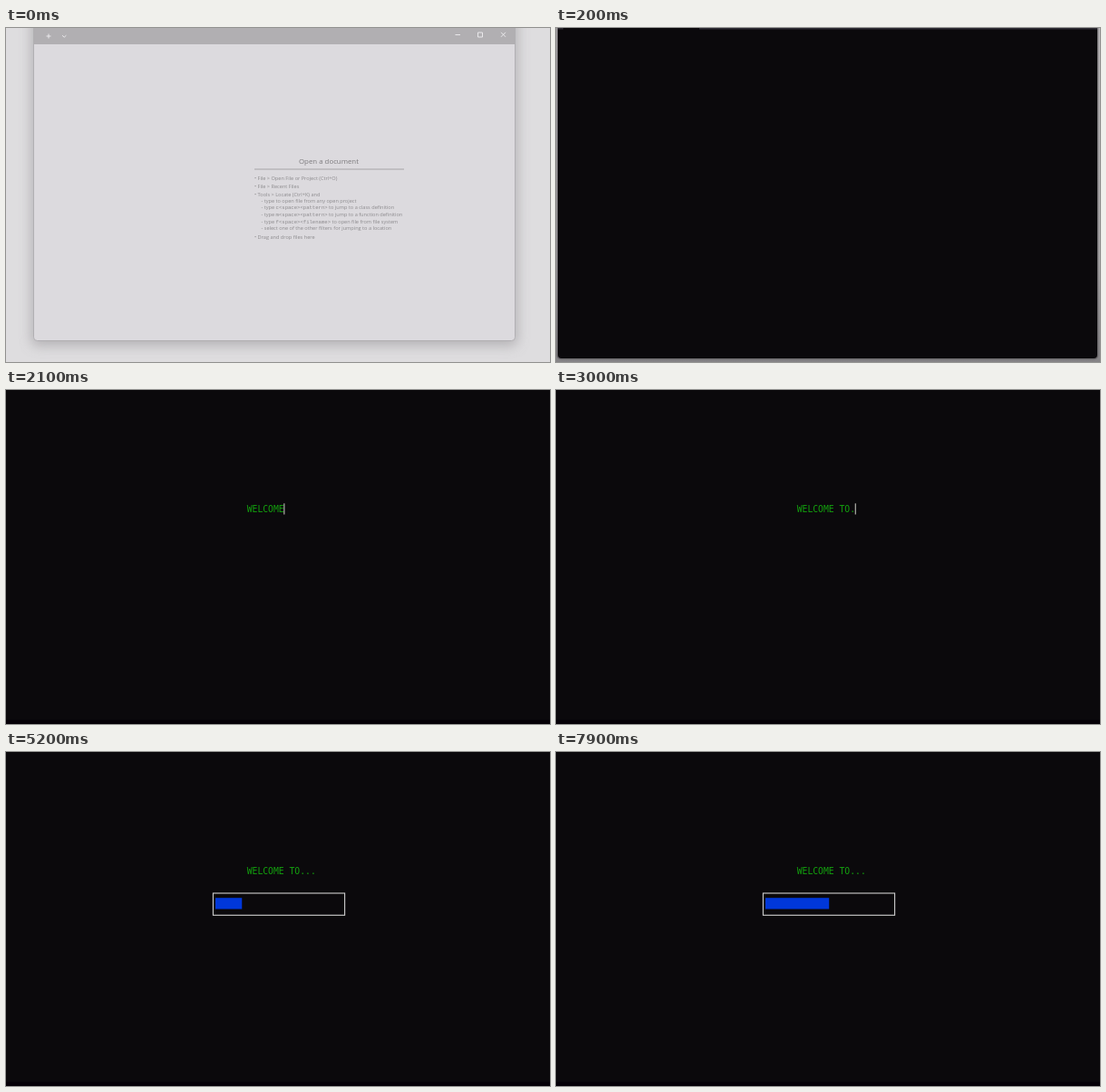
Write an HTML page that moves like this. It is 600 px wide and 369 px high and loops after 8000 ms.

```html
<!DOCTYPE html>
<html lang="en">
<head>
<meta charset="utf-8">
<title>Terminal welcome</title>
<style>
  html, body { margin: 0; width: 100%; height: 100%; overflow: hidden; background: #0b090c; }
  svg { display: block; width: 600px; height: 369px; }
  .hint { font: 5.6px "Open Sans", "Noto Sans", sans-serif; fill: #8c8a8d; }
  .hint .head { font-size: 7.85px; fill: #7c7a7d; }
  .hint .code { font: 5.6px "Liberation Mono", monospace; }
  .icon { fill: none; stroke: #f0eff1; stroke-width: .9; }
  .typed { font: 9.72px "DejaVu Sans Mono", "Noto Sans Mono", monospace; fill: #13a10e; white-space: pre; }
</style>
</head>
<body>
<svg viewBox="0 0 600 369">
  <defs>
    <filter id="soft" x="-10%" y="-10%" width="120%" height="120%"><feGaussianBlur stdDeviation="7"/></filter>
    <linearGradient id="edge" x1="0" y1="0" x2="0" y2="1">
      <stop offset="0" stop-color="#bcbabc"/><stop offset=".7" stop-color="#aaa8aa"/><stop offset="1" stop-color="#858386"/>
    </linearGradient>
  </defs>

  <g id="editor">
    <rect width="600" height="369" fill="#dedddf"/>
    <rect x="28" y="-20" width="536" height="371" rx="6" fill="#a5a3a6" opacity=".75" filter="url(#soft)"/>
    <rect x="30.5" y="-10" width="531" height="355.5" rx="4" fill="#dcdade" stroke="#aaa8ab" stroke-width=".8"/>
    <rect x="30" width="531.5" height="18" fill="#b1afb2"/>
    <path class="icon" d="M44.5 9h5M47 6.5v5M62 8.2l2.2 2 2.2-2M495.5 7.5h5.5M520.5 5h5v5h-5zM546 4.8l5 5M551 4.8l-5 5"/>
    <path d="M274 156h165" stroke="#a5a3a6"/>
    <g id="hint" class="hint">
      <text class="head" x="356" y="149.6" text-anchor="middle">Open a document</text>
    </g>
  </g>

  <g id="opening">
    <rect width="600" height="369" fill="url(#edge)"/>
    <rect id="shade" fill="#5f5d60" rx="5" opacity=".6"/>
    <rect id="pane" fill="#0b090c" rx="4"/>
    <rect id="tabs" x="158" fill="#2e2c34"/>
    <rect id="nub" width="6" fill="#2e2c34"/>
  </g>

  <g id="term">
    <rect width="600" height="369" fill="#0b090c"/>
    <rect y="364.5" width="600" height="4.5" fill="#050007"/>
    <text id="typed" class="typed" x="265.7" y="135"></text>
    <g id="meter">
      <rect x="228.4" y="156" width="145.2" height="24.3" fill="none" stroke="#d0d0d0" stroke-width="1.1"/>
      <rect id="fill" x="231" y="161.2" height="12.3" fill="#0037da"/>
    </g>
    <rect id="caret" width="1" height="12.2" fill="#d0d0c8"/>
  </g>
</svg>
<script>
const $ = id => document.getElementById(id);
const LOOP = 8000, CELL = 5.85;
const MESSAGE = "WELCOME TO...";
const keyTimes = [900, 1100, 1300, 1500, 1700, 1900, 2100, 2300, 2500, 2800, 3000, 3200, 3400];
const blockTimes = [3400, 3800, 4100, 4500, 5000, 5400, 5700, 6200, 6600, 7000, 7400, 7800];
// the caret switches on, off, on, ... at these times
const caretTimes = [1100, 1400, 1500, 1600, 1700, 2000, 2100, 2200, 2300, 2900, 3000, 3100, 3200, 3400,
  3600, 4200, 4500, 4700, 5000, 5200, 5400, 6300, 6600, 6800, 6900, 7900];

const hints = [
  [274, 167.6, "• File > Open File or Project (Ctrl+O)"],
  [274, 176.6, "• File > Recent Files"],
  [274, 185.7, "• Tools > Locate (Ctrl+K) and"],
  [281.5, 192.7, "- type to open file from any open project"],
  [281.5, 200.2, "- type ", "c<space><pattern>", " to jump to a class definition"],
  [281.5, 208, "- type ", "m<space><pattern>", " to jump to a function definition"],
  [281.5, 215.6, "- type ", "f<space><filename>", " to open file from file system"],
  [281.5, 223.3, "- select one of the other filters for jumping to a location"],
  [274, 232.5, "• Drag and drop files here"]
];

function set(el, attrs) {
  for (const name in attrs) el.setAttribute(name, attrs[name]);
}
function show(id, on) {
  $(id).style.display = on ? "" : "none";
}
function make(name, parent) {
  return parent.appendChild(document.createElementNS("http://www.w3.org/2000/svg", name));
}
const passed = (times, t) => times.filter(v => v <= t).length;

for (const [x, y, ...parts] of hints) {
  const line = make("text", $("hint"));
  set(line, { x, y });
  line.style.whiteSpace = "pre";
  parts.forEach((part, i) => {
    const span = make("tspan", line);
    span.textContent = part;
    if (i === 1) span.setAttribute("class", "code");
  });
}

function drawOpening(t) {
  const step = Math.floor(t / 100);
  const inset = [6, 2, 0][step - 1] || 0;
  const bar = [3.8, 1.5, 0][step - 1] || 0;
  const right = 599 - inset;
  set($("shade"), { x: inset - 1.5, y: -10, width: right - inset + 3, height: 376.5 });
  set($("pane"), { x: inset, y: -10, width: right - inset, height: 375 });
  set($("tabs"), { width: right - 158, height: bar });
  set($("nub"), { x: inset, height: bar });
}

function draw(t) {
  show("editor", t < 100);
  show("opening", t >= 100 && t < 400);
  show("term", t >= 400);
  if (t < 400) return drawOpening(t);

  const keys = passed(keyTimes, t), blocks = passed(blockTimes, t);
  $("typed").textContent = MESSAGE.slice(0, keys);
  show("meter", blocks > 0);
  set($("fill"), { width: blocks * CELL });
  show("caret", passed(caretTimes, t) % 2);
  set($("caret"), blocks
    ? { x: 231 + blocks * CELL, y: 161.2 }
    : { x: 265.4 + keys * CELL, y: 125.3 });
}

const start = performance.now();
function tick() {
  draw((performance.now() - start) % LOOP);
  requestAnimationFrame(tick);
}
tick();
</script>
</body>
</html>
```
